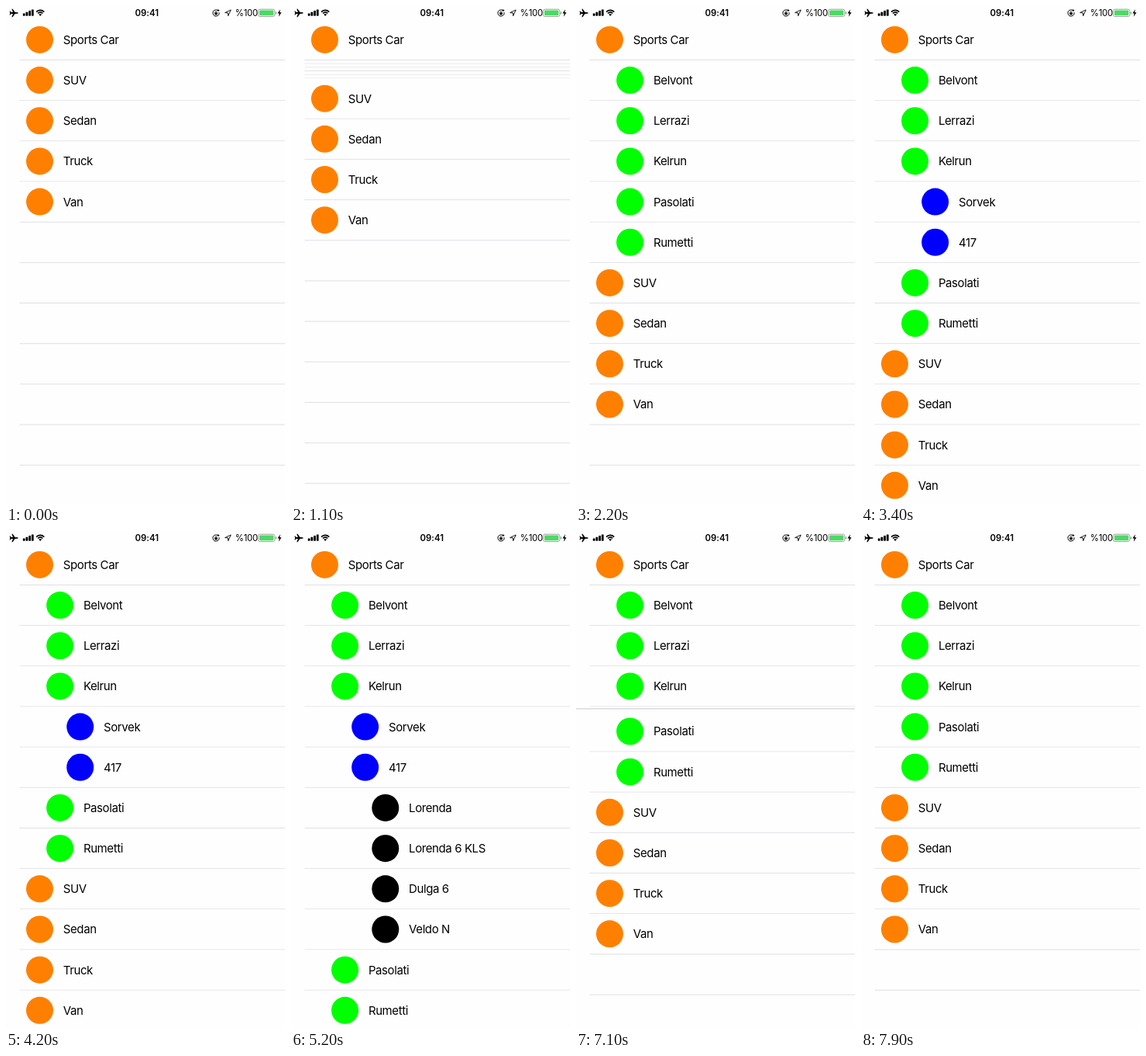
Animation of 360 by 640 pixels, one loop 8 s. Source, as an HTML page with a canvas:

```html
<!DOCTYPE html>
<html lang="en">
<head>
<meta charset="utf-8">
<title>Expandable list</title>
<style>
  html, body { margin: 0; width: 100%; height: 100%; overflow: hidden; background: #fefefe; }
  canvas { display: block; width: 360px; height: 640px; }
</style>
</head>
<body>
<canvas id="stage" width="360" height="640"></canvas>
<script>
const ctx = document.getElementById('stage').getContext('2d');
const W = 360, H = 640, LOOP = 8000, STEP = 100;
const TOP = 17.35, ROW = 52.17, SLIDE = 300;
const BG = '#fefefe', LINE = '#e0dfe5';
const COLORS = ['#ff8000', '#00ff00', '#0000ff', '#000000'];
const FONT = 'Inter, "Liberation Sans", sans-serif';

const node = (name, kids = [], open = 0, close = Infinity) => ({ name, kids, open, close });
const leaves = (...names) => names.map(n => node(n));

const model = node('417', leaves('Lorenda', 'Lorenda 6 KLS', 'Dulga 6', 'Veldo N'), 4540, 6498);
const make = node('Kelrun', [node('Sorvek'), model], 3040, 6850);
const tree = [
  node('Sports Car', [...leaves('Belvont', 'Lerrazi'), make, ...leaves('Pasolati', 'Rumetti')], 1037),
  ...leaves('SUV', 'Sedan', 'Truck', 'Van')
];

// Cubic ease-in-out with control points (.42, 0) and (.58, 1)
function ease(x) {
  if (x <= 0) return 0;
  if (x >= 1) return 1;
  let lo = 0, hi = 1;
  for (let i = 0; i < 24; i++) {
    const s = (lo + hi) / 2, r = 1 - s;
    if (3 * r * r * s * 0.42 + 3 * r * s * s * 0.58 + s * s * s < x) lo = s;
    else hi = s;
  }
  return lo * lo * (3 - 2 * lo);
}

function rule(y, x = 17.5, color = LINE) {
  ctx.fillStyle = color;
  ctx.fillRect(x, y - 0.5, W - x, 1);
}

function clipped(y, h, draw) {
  ctx.save();
  ctx.beginPath();
  ctx.rect(0, y, W, h);
  ctx.clip();
  draw();
  ctx.restore();
}

function text(str, x, y, size, weight, gap) {
  ctx.font = `${weight} ${size}px ${FONT}`;
  ctx.letterSpacing = gap + 'px';
  ctx.fillStyle = '#000';
  ctx.fillText(str, x, y);
}

function cell(name, level, y) {
  const x = 43.5 + level * 26.1, mid = y + ROW / 2;
  ctx.fillStyle = BG;
  ctx.fillRect(0, y + 0.5, W, ROW);
  ctx.fillStyle = COLORS[level];
  ctx.beginPath();
  ctx.arc(x, mid, 17.5, 0, Math.PI * 2);
  ctx.fill();
  text(name, x + 30.3, mid + 5.5, 15, 400, -0.4);
  rule(y + ROW);
}

// New rows slide down, each inside its growing slot
function opening(kids, level, y, h) {
  kids.forEach((k, i) => {
    const end = y + (i + 1) * h;
    clipped(end - h + 0.5, h, () => cell(k.name, level, end - ROW));
  });
}

// Leaving rows overlap: first half hangs from its slot top, the rest from its bottom
function closing(kids, level, y, h) {
  const half = kids.length / 2;
  clipped(y + 0.5, kids.length * h, () => {
    for (let i = kids.length - 1; i >= 0; i--) {
      cell(kids[i].name, level, i < half ? y + i * h : y + (i + 1) * h - ROW);
    }
    for (let i = 0; i < half; i++) rule(y + (i + 1) * h, 0, '#c9c9cc');
  });
}

function list(nodes, level, y, t) {
  for (const n of nodes) {
    cell(n.name, level, y);
    y += ROW;
    if (!n.kids.length) continue;
    const shut = ease((t - n.close) / SLIDE);
    const p = ease((t - n.open) / SLIDE) - shut;
    if (p >= 1) {
      y = list(n.kids, level + 1, y, t);
    } else if (p > 0) {
      (shut ? closing : opening)(n.kids, level + 1, y, p * ROW);
      y += n.kids.length * p * ROW;
    }
  }
  return y;
}

function poly(points, color = '#000') {
  ctx.fillStyle = color;
  ctx.beginPath();
  points.forEach(([x, y]) => ctx.lineTo(x, y));
  ctx.closePath();
  ctx.fill();
}

function pill(x, y, w, h, r, color, hollow) {
  ctx.beginPath();
  ctx.roundRect(x, y, w, h, r);
  ctx.fillStyle = ctx.strokeStyle = color;
  if (hollow) ctx.stroke();
  else ctx.fill();
}

function statusBar() {
  // plane
  poly([[16, 9], [15, 8.2], [11.6, 8.1], [8.6, 3.8], [7.4, 3.8], [8.9, 8.1], [6.6, 8.1],
    [5.5, 6.6], [4.6, 6.6], [5.3, 9], [4.6, 11.4], [5.5, 11.4], [6.6, 9.9], [8.9, 9.9],
    [7.4, 14.2], [8.6, 14.2], [11.6, 9.9], [15, 9.8]]);
  // signal
  for (let i = 0; i < 4; i++) {
    const h = 3.2 + i * 1.7;
    pill(21.8 + i * 3.7, 12.7 - h, 2.8, h, 0.6, '#000');
  }
  // wifi
  ctx.strokeStyle = '#000';
  ctx.lineWidth = 1.6;
  for (const r of [4.3, 7]) {
    ctx.beginPath();
    ctx.arc(44.2, 12.4, r, -Math.PI * 0.76, -Math.PI * 0.24);
    ctx.stroke();
  }
  poly([[44.2, 13], [42.2, 10.8], [43.2, 10.2], [45.2, 10.2], [46.2, 10.8]]);

  ctx.textAlign = 'center';
  text('09:41', 181.8, 13, 11.3, 600, 0.1);
  ctx.textAlign = 'left';

  // rotation lock
  ctx.strokeStyle = '#000';
  ctx.lineWidth = 1;
  ctx.beginPath();
  ctx.arc(271, 9, 4, -0.2, Math.PI * 1.75);
  ctx.stroke();
  poly([[272.6, 4.2], [275.6, 5.2], [273.6, 7.2]]);
  ctx.fillStyle = '#000';
  ctx.fillRect(269.2, 8.5, 3.6, 2.8);
  ctx.lineWidth = 0.8;
  ctx.beginPath();
  ctx.arc(271, 8.5, 1.2, Math.PI, 0);
  ctx.stroke();
  // location
  ctx.lineWidth = 0.9;
  ctx.beginPath();
  [[290.2, 5], [282.6, 8.6], [286.4, 8.9], [286.7, 12.7]].forEach(([x, y]) => ctx.lineTo(x, y));
  ctx.closePath();
  ctx.stroke();

  text('%100', 295.8, 13, 11.3, 400, -0.2);

  // battery
  ctx.lineWidth = 0.8;
  pill(325.4, 4.2, 21.4, 9.4, 2.4, '#8d8d8d', true);
  pill(326.9, 5.6, 18.4, 6.6, 1.2, '#4cd964');
  pill(347.7, 7.3, 1.2, 3.2, 0.6, '#8d8d8d');
  poly([[353.9, 4.2], [350.4, 9.5], [352.6, 9.5], [351.8, 13.7], [355.5, 8.2], [353.2, 8.2]]);
}

function render(t) {
  ctx.fillStyle = BG;
  ctx.fillRect(0, 0, W, H);
  let y = list(tree, 0, TOP, t);
  while ((y += ROW) < H + 1) rule(y);
  statusBar();
}

const start = performance.now();
function tick() {
  const t = (performance.now() - start) % LOOP;
  render(Math.floor(t / STEP) * STEP);
  requestAnimationFrame(tick);
}
tick();
</script>
</body>
</html>
```
